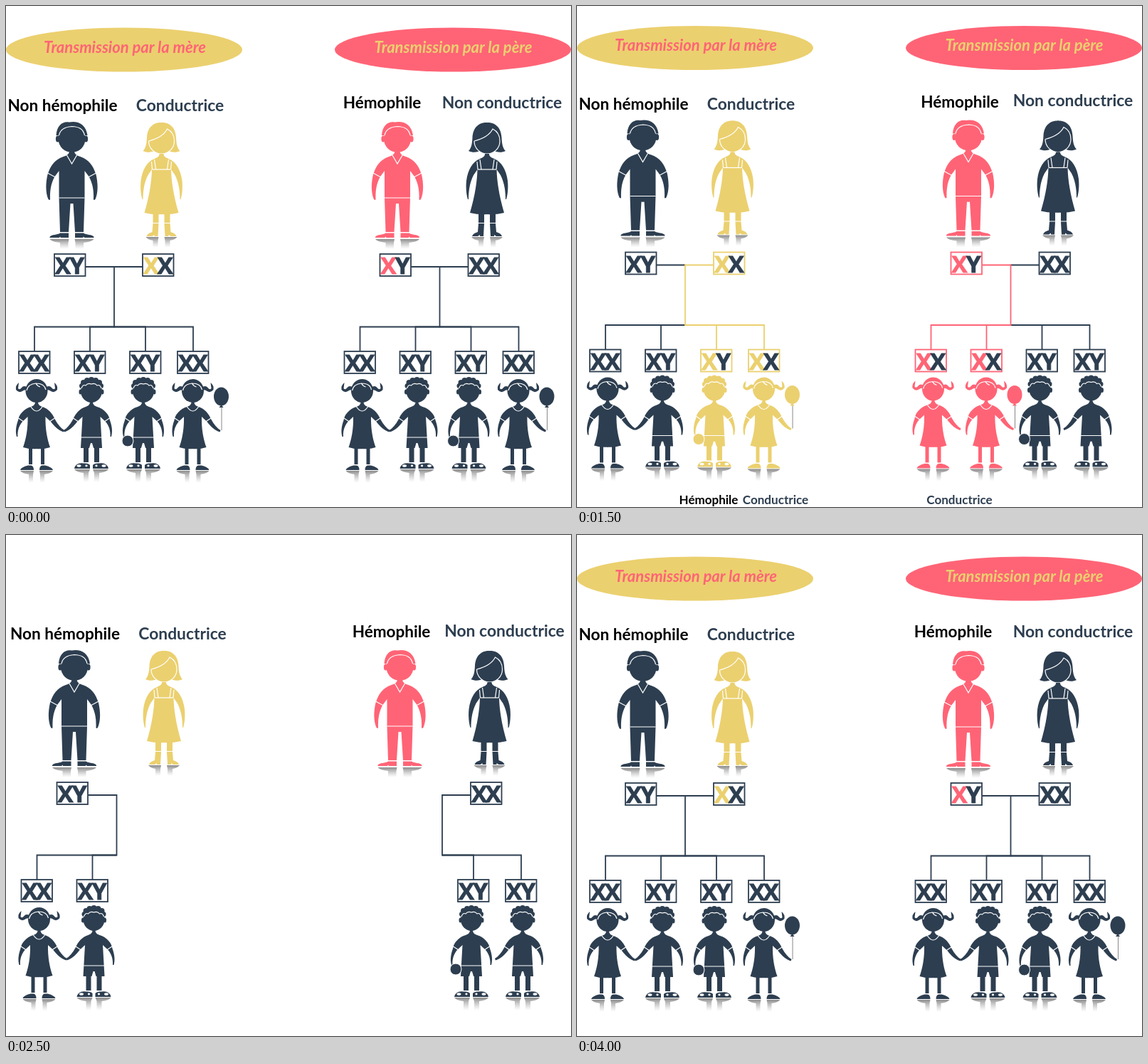
Animation, 794 px wide and 705 px high, one loop 5 s. Source, as an HTML page:

```html
<!DOCTYPE html>
<html lang="fr">
<head>
<meta charset="utf-8">
<title>Transmission de l'hémophilie</title>
<style>
  html, body { margin: 0; width: 100%; height: 100%; overflow: hidden; background: #fff; }
  svg { display: block; width: 794px; height: 705px; }
  text { font-family: Lato, "Open Sans", sans-serif; font-weight: 700; text-anchor: middle; }
  .gene { font-family: "Open Sans", "Noto Sans", sans-serif; font-size: 33px; stroke-width: .9; }
  .title { font-style: italic; font-size: 22px; }
  .seam { fill: none; stroke: #fff; stroke-width: 1.2; }
</style>
</head>
<body>
<svg id="stage" viewBox="0 0 794 705">
  <defs>
    <linearGradient id="fade" x1="0" y1="0" x2="0" y2="1">
      <stop offset="0" stop-color="#777" stop-opacity=".85"/>
      <stop offset="1" stop-color="#aaa" stop-opacity="0"/>
    </linearGradient>
  </defs>
</svg>
<script>
const NAVY = '#2d3e50', GOLD = '#ebd06f', PINK = '#ff6476', BLACK = '#000';

const path = d => `<path d="${d}"/>`;
const seam = d => `<path class="seam" d="${d}"/>`;
const oval = (x, y, rx, ry = rx, more = '') => `<ellipse cx="${x}" cy="${y}" rx="${rx}" ry="${ry}" ${more}/>`;
const flip = s => `<g transform="scale(-1 1)">${s}</g>`;
const both = s => s + flip(s);
const at = (x, y, s, color = NAVY) => `<g transform="translate(${x} ${y})" fill="${color}">${s}</g>`;
const label = (x, y, s, color, size) => `<text x="${x}" y="${y}" fill="${color}" font-size="${size}">${s}</text>`;
const line = (d, color) => `<path d="${d}" fill="none" stroke="${color}" stroke-width="1.8"/>`;

// Fading reflection of one foot: sole from a to b, leg from l to r
const shadow = (y, a, b, l, r, h) =>
  `<path fill="url(#fade)" d="M${a} ${y}H${b}Q${b - 3} ${y + 4} ${r} ${y + 5}V${y + h}H${l}V${y + 5}Z"/>`;

// Adults: x is measured from the middle, y from the top of the hair
const man =
  path('M-22 19C-21 5-13-1-4 .5C8-2 20 3 22 19Z') + oval(0, 24, 19, 19) +
  both(
    oval(20, 24, 2.6, 4.5) +
    path('M-1 42H3.5C4.5 46 8 48 12 49C24 53 30 62 34 74C37 87 37 100 33 109C31 111 30.5 110 30.5 108C31 96 29 86 24 77L18 69V107L16.5 155H4.5L2 115H-1Z') +
    path('M4.5 156.5H16.5C20 159.5 29 158 31 162V163H18L16 161.5V163H4.5Z') +
    shadow(165, 4, 31, 5, 16.5, 14) +
    seam('M36 71L23 78')) +
  seam('M-18 19C-16 9-8 7 0 6.5C9 7 16 9 18 19') +
  seam('M-7 47L0 59L7 47M-18 107H18');

const woman =
  both(path('M-1 0C14-1 20 10 20.5 21C21 30 22 36 26 40C20 43 13 42 9 39H-1Z')) +
  oval(0, 26, 17, 18) +
  seam('M-18 26C-6 23 4 17 8 9C14 12 18 18 18 26C18 37 9 44 0 44C-9 44-18 37-18 26') +
  both(
    path('M-1 44H3C3 48 6 49 10 51C20 55 27 66 29 82C30 92 29 102 27 108H26C26 95 24 84 19 74L13.5 66C14 88 19 110 24 127Q12 130-1 129Z') +
    path('M4 128H12V141H4ZM4 142H12L13 154Q20 156 21 160H13L10 158V160H5Z') +
    shadow(161, 4, 22, 5, 12, 15) +
    seam('M10 52L8 66M14 55L13 66')) +
  seam('M-13 66H13');

// Children share the arm outlines; the trunk closes each half
const armDown = 'M-1 32H2C2 36 5 38 8 39C18 42 25 50 26 58C29 66 30 74 28 81H26.5C27 73 25 66 20 60L12.5 53';
const armOut = 'M-1 32H2C2 36 5 38 8 39C17 42 22 48 26 57C30 64 34 69 39 72L38 74.5C31 72 25 67 20 60L12.5 53';
const cuff = seam('M27 54L18 60');

const dress = 'C12 70 15 85 19 96Q10 99-1 98Z';
const girl =
  oval(0, 16.5, 15.5, 16.5) +
  both(
    path('M12 12Q18 8 21 12Q24 16 26 13L25 5Q30 9 29 15Q25 20 20 17Q17 14 12 16Z') +
    path('M6 97H11V120H6ZM4 128Q4 122 8 121.5H12Q22 124 23 128Z') +
    shadow(129, 4, 23, 5, 11, 17)) +
  path(armOut + dress) + flip(path(armDown + dress)) + both(cuff) +
  seam('M-14 16Q-12 7-1 6Q1 10 5 11M-1 6Q11 6 13 15M-8 39Q0 51 8 39');

const balloon = girl + oval(40, 24.5, 10.5, 13) + path('M40 36L43 40H37Z') +
  '<path d="M40.5 40V72" stroke="#888"/>';

const trunk = 'L15 97H3L1 90H-1Z';
const lad = leftArm =>
  oval(0, 17, 15, 16) + oval(0, 1, 4) +
  both(
    oval(6, 2, 4) + oval(11, 5, 4) + oval(13.5, 9.5, 3.5) + oval(15.5, 18, 2, 3.5) +
    path('M4 96H11V117H4ZM2 126V121Q4 118 11 118.5Q22 117 24 126Z') +
    oval(17.5, 122, 3, 1.8, 'fill="#fff"') + oval(7, 122, 1.6, 1.4, 'fill="#fff"') +
    shadow(127, 2, 24, 4, 11, 18) + cuff) +
  path(armDown + trunk) + flip(path(leftArm + trunk)) + both(cuff) +
  seam('M-14 13Q-12 7-8 9Q-5 5 0 7Q5 5 8 9Q12 7 14 13M-15 82H15');

const boy = lad(armOut);
const player = lad(armDown) + oval(-22, 87, 8, 8, 'stroke="#fff"');

const GIRL = { art: girl, dx: 3, genes: 'XX' }, BALLOON = { art: balloon, dx: -.5, genes: 'XX' };
const BOY = { art: boy, dx: 2, genes: 'XY' }, PLAYER = { art: player, dx: -3, genes: 'XY' };

function genes(x, y, pair, first, frame) {
  const letter = (c, i) => {
    const color = i ? NAVY : first;
    return `<text class="gene" x="${x - 9.9 + i * 19.6}" y="${y + 28}" fill="${color}" stroke="${color}">${c}</text>`;
  };
  return `<rect x="${x - 22}" y="${y}" width="43.5" height="31" fill="#fff" stroke="${frame}" stroke-width="1.8"/>` +
    [...pair].map(letter).join('');
}

// stage: 'plain' before transmission, 'safe' unaffected line only, 'full' everything
function family(right, stage) {
  const tint = right ? PINK : GOLD, plain = stage === 'plain', full = stage === 'full';
  const affected = i => !plain && (i > 1) !== right;
  const tone = hit => hit ? tint : NAVY;
  const kids = right && !plain ? [GIRL, BALLOON, PLAYER, BOY] : [GIRL, BOY, PLAYER, BALLOON];
  let s = at(92.5, 163, man, right ? PINK : NAVY) + at(218.5, 164, woman, right ? NAVY : GOLD);

  [[90, 'XY', 112, right], [214, 'XX', 192, !right]].forEach(([x, pair, edge, carrier]) => {
    if (carrier && stage === 'safe') return;
    s += line(`M${edge} 367H152`, tone(carrier && full)) +
      genes(x, 349, pair, tone(carrier), tone(carrier && full));
  });

  [40, 118, 196, 263].forEach((x, i) => {
    const hit = affected(i);
    if (hit && !full) return;
    const color = tone(hit), kid = kids[i];
    s += line(`M152 451.5H${x}V486`, color) + genes(x, 486, kid.genes, color, color) +
      at(x + kid.dx, 525, kid.art, color);
  });
  s += line('M152 366V452.4', tone(full));
  return `<g transform="translate(${right ? 457.5 : 0})">${s}</g>`;
}

function scene(stage, dx, dy) {
  const [hx, hy] = stage === 'plain' ? [528.5, 143.5] : [538, 145];
  let s = family(false, stage) + family(true, stage) +
    label(79.5, 148, 'Non hémophile', BLACK, 22.6) +
    label(244.5, 148, 'Conductrice', NAVY, 22.8) +
    label(hx, hy, 'Hémophile', BLACK, 22.5) +
    label(697, 143.5, 'Non conductrice', NAVY, 22.9);
  if (stage !== 'safe') s +=
    oval(166, 61.5, 166, 31, `fill="${GOLD}"`) + oval(628, 61.5, 166, 31, `fill="${PINK}"`) +
    `<text class="title" x="167" y="65.5" fill="${PINK}">Transmission par la mère</text>` +
    `<text class="title" x="628.5" y="65.5" fill="${GOLD}">Transmission par la père</text>`;
  if (stage === 'full') s +=
    label(185, 703.5, 'Hémophile', BLACK, 17) +
    label(279, 703.5, 'Conductrice', NAVY, 17.1) +
    label(537.5, 703.5, 'Conductrice', NAVY, 17.1);
  return `<g class="scene" transform="translate(${dx} ${dy})">${s}</g>`;
}

const svg = document.getElementById('stage');
svg.insertAdjacentHTML('beforeend', scene('plain', 0, 0) + scene('safe', 3.5, -1) + scene('full', 0, -2.5));
const scenes = svg.querySelectorAll('.scene');

// [end time, scene]
const cues = [[1000, 0], [1500, 1], [2500, 2], [3000, 1], [4000, 2], [5000, 0]];
const start = performance.now();
function draw() {
  const t = (performance.now() - start) % 5000;
  const now = cues.find(c => t < c[0])[1];
  scenes.forEach((g, i) => g.style.display = i === now ? '' : 'none');
  requestAnimationFrame(draw);
}
draw();
</script>
</body>
</html>
```
